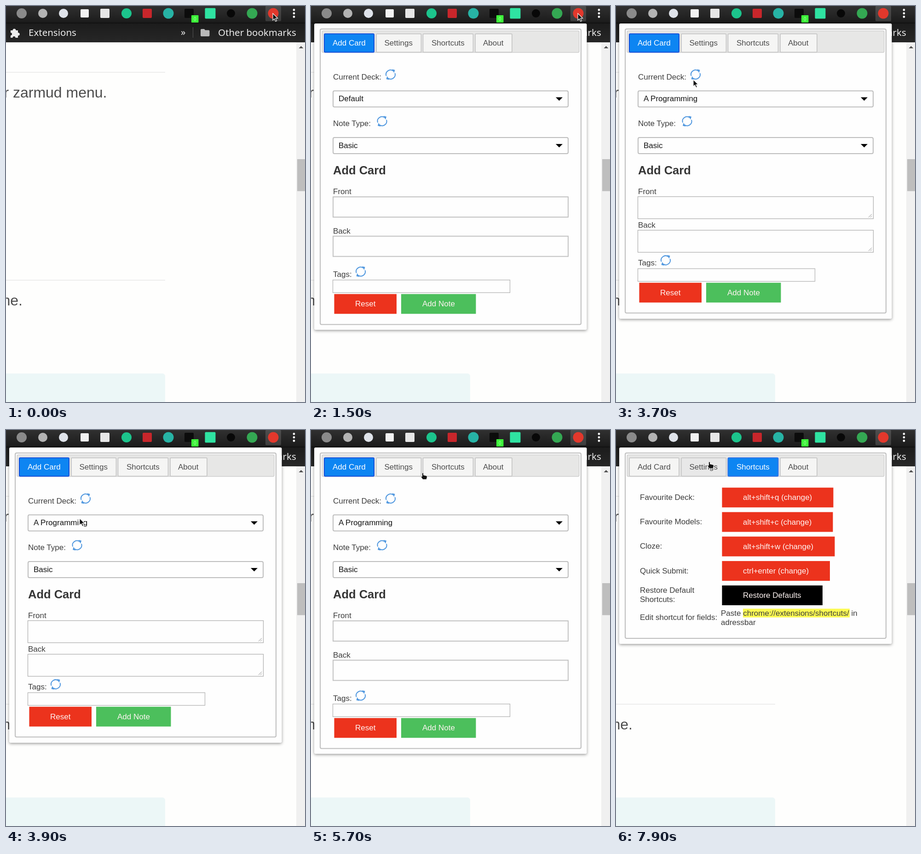
Animation, 650 px wide and 861 px high, one loop 8 s. Source, as an HTML page:

```html
<!DOCTYPE html>
<html lang="en">
<head>
<meta charset="utf-8">
<title>Add card popup</title>
<style>
html, body { margin: 0; width: 100%; height: 100%; overflow: hidden; background: #fefefd; }
svg { display: block; width: 650px; height: 861px; }
text { font: 17px "Liberation Sans", Arial, sans-serif; fill: #3c3c3c; white-space: pre; }
.bar { font: 20.5px "Noto Sans", "Open Sans", sans-serif; fill: #ececec; }
.page { font-size: 32px; fill: #4c4c4c; }
.head { font-size: 25.5px; font-weight: bold; fill: #363636; }
.dark { fill: #111; }
.light { fill: #fff4f2; }
#sheet { filter: drop-shadow(0 2px 3px rgba(0, 0, 0, .4)); }
</style>
</head>
<body>
<svg id="stage" viewBox="0 0 650 861"></svg>
<script>
const rect = (x, y, r, b, attrs = '') =>
  `<rect x="${x}" y="${y}" width="${r - x}" height="${b - y}" ${attrs}/>`;
const text = (x, y, s, cls = '', attrs = '') =>
  `<text x="${x}" y="${y}" class="${cls}" ${attrs}>${s}</text>`;
const group = (id, body, attrs = '') => `<g id="${id}" ${attrs}>${body}</g>`;
const stroke = (color, width, fill = '#fefefe') => `fill="${fill}" stroke="${color}" stroke-width="${width}"`;
const dot = (x, y, r, fill) => `<circle cx="${x}" cy="${y}" r="${r}" fill="${fill}"/>`;
const tile = (x, y, h, fill) => rect(x - h, y - h, x + h, y + h, `rx="2" fill="${fill}"`);

// Browser page and toolbars
const page =
  rect(0, 0, 650, 861, 'fill="#fefefd"') +
  rect(0, 143.5, 346, 145, 'fill="#e8e8e8"') +
  rect(0, 595.5, 346, 597, 'fill="#e8e8e8"') +
  text(-4.6, 198.5, 'r zarmud menu.', 'page') +
  text(36, 651, 'me.', 'page', 'text-anchor="end"') +
  rect(-10, 799, 346, 880, 'rx="6" fill="#ecf7f7"') +
  rect(631, 79, 650, 861, 'fill="#f0f0f0"') +
  rect(633, 333, 650, 402.5, 'fill="#bebebe"') +
  '<path d="M636.5 92L641.5 87L646.5 92Z" fill="#505050"/>';

const icons = [
  [dot, 34, 11, '#8a8a8a'], [dot, 80, 10, '#b4b4b4'], [dot, 125, 10, '#dfe3ea'],
  [tile, 171, 9, '#f2f2f2'], [tile, 215, 10, '#e6e6e6'], [dot, 262, 11, '#1cc48c'],
  [tile, 307, 10, '#c8262b'], [dot, 353, 11.5, '#27b3a5'], [tile, 398, 10, '#0c0c0c'],
  [tile, 444, 11.5, '#2fe3a2'], [dot, 489, 9, '#080808'], [dot, 535, 11.5, '#34a853'],
];
const toolbar =
  rect(0, 0, 650, 36, 'fill="url(#top)"') +
  rect(0, 36, 650, 38, 'fill="#121212"') +
  rect(0, 38, 650, 79, 'fill="url(#marks)"') +
  icons.map(([shape, x, size, color]) => shape(x, 16, size, color)).join('') +
  rect(403, 20, 418.5, 36, 'rx="1" fill="#3df23a"') +
  text(408, 32, '0', '', 'style="font-size:10px;fill:#a8ffa0"') +
  rect(564, 0, 598, 33, 'id="press" rx="2" fill="#fff"') +
  dot(581, 16, 11.5, '#e2382c') +
  [8.5, 16, 23.5].map(y => dot(626, y, 2.4, '#f4f4f4')).join('') +
  '<path d="M10 53h4.500a3.500 3.500 0 1 1 7 0H26v5a3.300 3.300 0 1 1 0 6.500V69h-5.500a3 3 0 0 0-6 0H10v-5a3 3 0 0 0 0-6Z" fill="#eee"/>' +
  text(49, 65, 'Extensions', 'bar') +
  text(380, 64, '»', 'bar') +
  rect(406, 46, 407, 69, 'fill="#555"') +
  '<path d="M423 52q0-2 2-2h6l2 2.500h7.500q2 0 2 2V64q0 2-2 2H425q-2 0-2-2Z" fill="#b9b9b9"/>' +
  text(461, 65, 'Other bookmarks', 'bar');

// Popup parts
const tabs = [['Add Card', 29, 137, 47], ['Settings', 142, 239.5, 159.5],
              ['Shortcuts', 243.5, 352.5, 262], ['About', 357, 437, 374]];
const tabBar =
  rect(24, 54, 583, 101, `rx="3" ${stroke('#cfcfcf', 1.5, '#e7e7e6')}`) +
  tabs.map(([name, x, r, tx], i) =>
    rect(x, 60.5, r, 100.5, `id="tab${i}" rx="2" stroke-width="2"`) +
    text(tx, 85.5, name, '', `id="name${i}"`)).join('');

const refresh = (x, y) => `<g transform="translate(${x} ${y})" fill="none" stroke="#4f97df" stroke-width="2">` +
  [0, 180].map(a => `<g transform="rotate(${a})"><path d="M-9.500 3A9.800 9.800 0 0 1 5.500-8"/>` +
    '<path d="M3-11.500L9.500-10L7.500-3.500Z" fill="#4f97df" stroke="none"/></g>').join('') + '</g>';
const select = (y, label, id) =>
  rect(48, y, 559, y + 35, `rx="3" ${stroke('#bdbdbd', 2)}`) +
  text(60, y + 22.7, label, 'dark', `id="${id}"`) +
  `<path d="M532 ${y + 14}h15l-7.500 7.500Z" fill="#000"/>`;
const area = y => rect(47.5, y, 559.5, y + 48, stroke('#b0b0b0', 1.3)) +
  `<path d="M549 ${y + 45}l7-7M553 ${y + 45}l3-3" stroke="#888"/>`;
const editor = y => rect(48, y, 559, y + 44, stroke('#c2c2c2', 2));
const button = (x, y, r, color, tx, label) =>
  rect(x, y, r, y + 43, `fill="${color}"`) + text(tx, y + 27, label, 'light');
const ring = (id, x, y) => rect(x, y, x + 40.5, y + 31, `id="${id}" rx="2" ${stroke('#6fa3d8', 1.6, 'none')}`);

const form =
  text(48, 159.5, 'Current Deck:') + refresh(173, 149) + select(184.5, 'Default', 'deck') +
  text(48, 261.3, 'Note Type:') + refresh(154.5, 250.5) + select(286, 'Basic', 'kind') +
  ring('deckRing', 152.5, 135.500) + ring('kindRing', 134.500, 237) +
  text(48, 365.5, 'Add Card', 'head') + text(48, 409, 'Front') +
  group('tall', editor(415) + editor(500.5) + text(48, 494.5, 'Back')) +
  group('short', area(414.5) + area(487.5) + text(48, 482, 'Back')) +
  group('foot',
    text(48, 588.5, 'Tags:') + refresh(108, 577.5) +
    rect(47.5, 595.7, 432.5, 623.3, stroke('#b4b4b4', 1.3)) +
    button(50.5, 626.300, 186, '#ec331d', 96, 'Reset') +
    button(196, 626.300, 358.5, '#4cbf5c', 242, 'Add Note'));

const keys = [['Favourite Deck:', 'alt+shift+q', 472.5], ['Favourite Models:', 'alt+shift+c', 471.5],
              ['Cloze:', 'alt+shift+w', 475.5], ['Quick Submit:', 'ctrl+enter', 465]];
const shortcuts =
  keys.map(([label, combo, r], i) => {
    const y = 125.3 + i * 53.2;
    return text(52, y + 26.7, label) + button(230.5, y, r, '#ec331d', 276, combo + ' (change)');
  }).join('') +
  text(52, 354, 'Restore Default') + text(52, 374, 'Shortcuts:') +
  button(230.5, 338, 449, '#000', 276, 'Restore Defaults') +
  text(52, 413, 'Edit shortcut for fields:') +
  rect(276, 388.5, 508, 407.5, 'fill="#fdfb52"') +
  text(228, 403.500, 'Paste chrome://extensions/shortcuts/ in') + text(228, 423.5, 'adressbar');

const arrow = '<path d="M0 0V15L3.500 11.800L6 17.500L8.500 16.400L6 10.800H10.800Z" fill="#111" stroke="#fff" stroke-width="1.1"/>';
const hand = '<path d="M-1.500 1Q0-1 1.500 1V5L8 6.500Q9.500 7 9.500 9L8 14.500H0L-3.500 9.500Q-4 7-1.500 8Z" fill="#111" stroke="#fff" stroke-width=".8"/>';

const gradient = (id, a, b) => `<linearGradient id="${id}" x2="0" y2="1"><stop stop-color="${a}"/><stop offset="1" stop-color="${b}"/></linearGradient>`;
const stage = document.getElementById('stage');
stage.innerHTML =
  `<defs>${gradient('top', '#303030', '#1b1b1b')}${gradient('marks', '#1c1c1c', '#272727')}` +
  `<clipPath id="cut">${rect(7, 38, 599.5, 704, 'id="cutBox"')}</clipPath></defs>` +
  page + toolbar +
  group('popup',
    rect(7, 38, 599.5, 704, 'id="sheet" rx="3" fill="#fefefe"') +
    group('body',
      rect(20, 50, 587, 692, `id="frame" rx="3" ${stroke('#bdbdbd', 2)}`) +
      tabBar + group('form', form) + group('shortcuts', shortcuts), 'clip-path="url(#cut)"')) +
  group('cursor', group('arrow', arrow) + group('hand', hand));

// Step tables: [time, value...]
const LOOP = 8000, STEP = 100;
const pointer = [
  [0, 580, 16, 0], [1600, -50, -50, 0], [1700, 200, 106, 0],
  [2200, 200, 101, 1], [2300, 238, 88, 1], [2400, 290, 74, 1], [2500, 321, 68, 1],
  [2900, 176, 154, 0], [3000, 170, 152, 0], [3100, 168, 149, 0],
  [3700, 168, 160, 0], [3800, 164, 178, 0], [3900, 160, 192, 0], [4000, 157, 212, 0],
  [4100, 154, 235, 0], [4200, 152, 252, 0], [4300, 152, 259, 0],
  [5500, 165, 228, 0], [5600, 205, 150, 0], [5700, 243, 93, 1], [5800, 246, 92, 1],
  [6000, 291, 52, 0], [6200, 292, 60, 1], [6300, 294, 70, 1], [6400, 295, 78, 0], [6600, 295, 78, 1],
  [7000, 292, 82, 1], [7100, 282, 92, 1], [7200, 262, 104, 0], [7300, 240, 110, 0],
  [7400, 214, 104, 0], [7500, 186, 98, 1], [7600, 168, 97, 1],
  [7700, 164, 92, 1], [7800, 182, 80, 1], [7900, 203, 69, 1],
];
const fade = [[0, 0], [800, .12], [900, .25], [1000, .38], [1100, .5], [1200, .66], [1300, .84], [1400, 1]];
const press = [[0, .13], [100, .16], [200, .2], [300, .17], [400, .14]];
const layout = [[0, 'short'], [1500, 'tall'], [3700, 'short'], [4000, 'tall'],
                [5500, 'short'], [5600, 'tall'], [6800, 'keys']];
const bottoms = [[0, 680], [1500, 704], [3700, 680], [4000, 704], [5200, 536], [5300, 704],
                 [5500, 680], [5600, 704], [6900, 465]];
const frameEnd = { short: 667.5, tall: 692.5, keys: 453 };

const at = (table, t) => table.findLast(row => row[0] <= t).slice(1);
const within = (t, a, b) => t >= a && t < b;
const el = id => document.getElementById(id);
const show = (id, on) => { el(id).style.display = on ? '' : 'none'; };
const set = (id, name, value) => el(id).setAttribute(name, value);

function draw(t) {
  const [alpha] = at(fade, t), [mode] = at(layout, t), [bottom] = at(bottoms, t);
  const [x, y, isHand] = at(pointer, t);

  set('press', 'opacity', at(press, t)[0]);
  set('popup', 'opacity', alpha);
  set('popup', 'transform', `translate(0 ${-4.4 * (1 - alpha)})`);
  for (const id of ['sheet', 'cutBox']) set(id, 'height', bottom - 38);
  set('frame', 'height', frameEnd[mode] - 50);

  show('form', mode !== 'keys');
  show('shortcuts', mode === 'keys');
  show('tall', mode === 'tall');
  show('short', mode === 'short');
  set('foot', 'transform', `translate(0 ${mode === 'short' ? -24.6 : 0})`);
  el('deck').textContent = t < 3700 ? 'Default' : 'A Programming';
  show('deckRing', within(t, 3400, 3700));
  show('kindRing', within(t, 5000, 5500));

  const active = mode === 'keys' ? 2 : 0;
  const hover = within(t, 6200, 6800) ? 2 : t >= 7500 ? 1 : -1;
  tabs.forEach((_, i) => {
    set('tab' + i, 'fill', i === active ? '#0d85f2' : i === hover ? '#e8e8e8' : '#f5f5f4');
    set('tab' + i, 'stroke', i !== active ? '#cacaca' : active ? '#2f70e6' : '#1450dc');
    el('name' + i).style.fill = i === active ? '#fff' : '#4c4c4c';
  });

  set('cursor', 'transform', `translate(${x} ${y})`);
  show('arrow', !isHand);
  show('hand', isHand);
}

const start = performance.now();
function tick() {
  const t = (performance.now() - start) % LOOP;
  draw(Math.floor(t / STEP) * STEP);
  requestAnimationFrame(tick);
}
tick();
</script>
</body>
</html>
```
